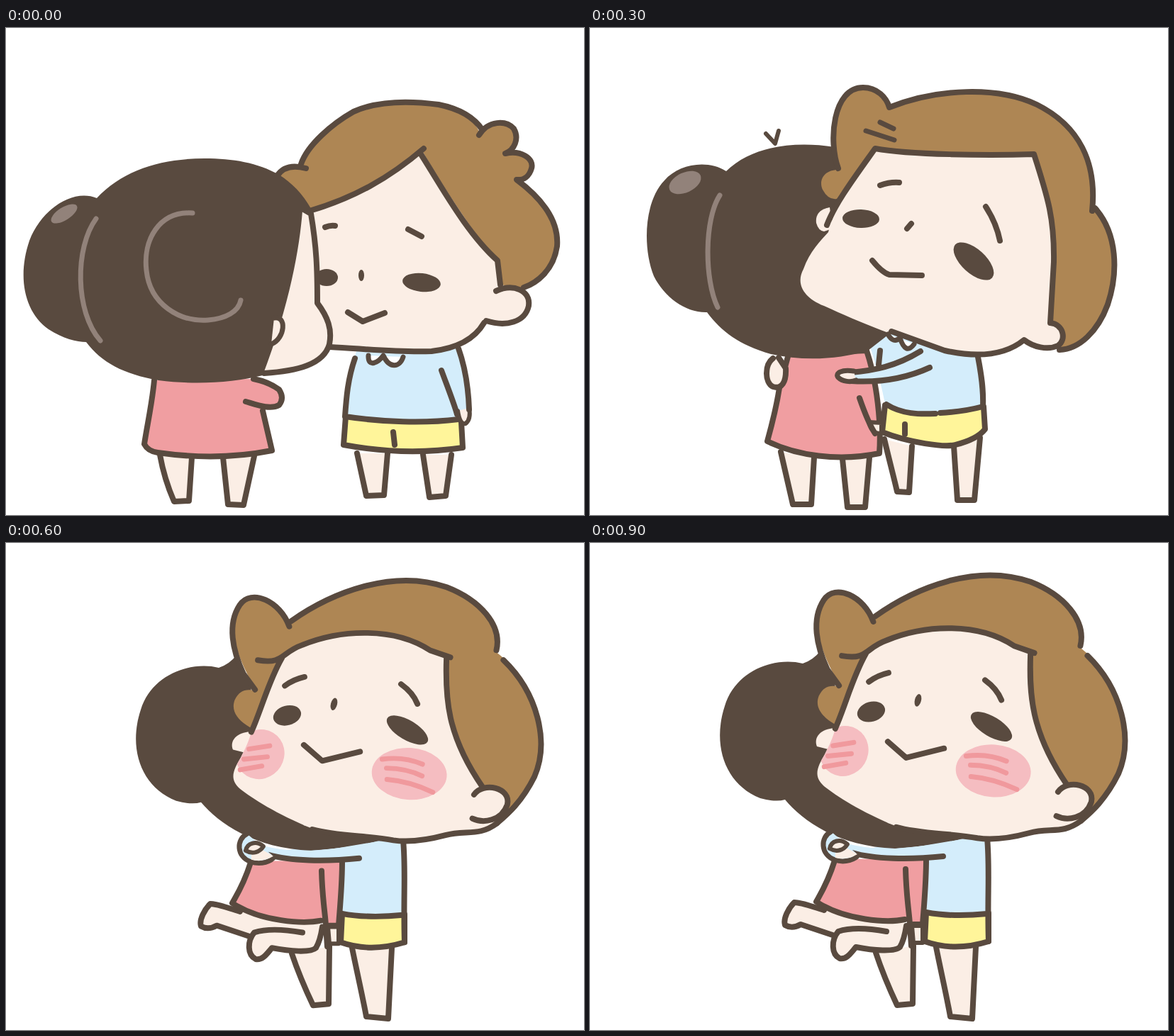
An HTML page that plays this animation: 815x687 px, repeating every 1000 ms.

```html
<!DOCTYPE html>
<html lang="en">
<head>
<meta charset="utf-8">
<title>Hug</title>
<style>
html, body { margin: 0; width: 100%; height: 100%; overflow: hidden; background: #fff; }
svg { display: block; width: 100%; height: 100%; stroke-linecap: round; stroke-linejoin: round; }
</style>
</head>
<body>
<svg id="stage" viewBox="0 0 815 687"></svg>
<script>
const INK = '#594a3f', SKIN = '#fbeee5', HAIR = '#ae8654', PINK = '#f09ea1', BLUE = '#d4edfb',
  YELLOW = '#fff59a', SHINE = '#92827a', BLUSH = '#f5bdc1', STREAK = '#f0999d';

const fill = (color, d) => `<path d="${d}" fill="${color}"/>`;
const line = (d, w = 8, color = INK) => `<path d="${d}" fill="none" stroke="${color}" stroke-width="${w}"/>`;
const shape = (color, d, w = 8) => `<path d="${d}" fill="${color}" stroke="${INK}" stroke-width="${w}"/>`;
const oval = (x, y, rx, ry, turn = 0, color = INK) =>
  `<ellipse cx="${x}" cy="${y}" rx="${rx}" ry="${ry}" fill="${color}" transform="rotate(${turn} ${x} ${y})"/>`;
const group = (transform, ...parts) => `<g transform="${transform}">${parts.join('')}</g>`;

// Girl standing, seen from behind
const girl =
  shape(SKIN, 'M217 602C222 630 230 652 237 668L258 667L262 606') +
  shape(SKIN, 'M306 606L313 672L335 673L350 604') +
  fill(PINK, 'M209 497L195 587Q200 598 214 600C270 607 325 606 375 596L361 538Q375 538 385 533Q393 522 385 510Q370 498 349 495Z') +
  line('M209 497C206 530 199 560 195 587Q200 597 214 599C270 607 325 606 375 596L362 540M338 527C352 531 372 539 385 532Q393 522 385 510Q370 499 349 495') +
  shape(SKIN, 'M418 255L430 262C438 310 439 340 439 388C454 408 460 425 456 446C448 475 410 484 364 487') +
  fill(INK, 'M128 240C95 226 50 255 33 300C16 350 25 400 60 425C80 438 100 443 113 443C135 472 165 488 215 497C270 504 320 500 362 490C400 390 414 310 418 258L434 262C420 235 405 220 385 207C355 190 320 184 280 184C220 184 165 200 128 240Z') +
  shape(SKIN, 'M378 409C396 405 394 438 374 446', 7) +
  oval(82, 262, 21, 9, -32, SHINE) +
  line('M127 269C97 310 97 400 133 441', 7, SHINE) +
  line('M263 261C215 258 193 300 198 342C203 390 245 415 285 412C310 410 328 400 331 384', 7, SHINE);

// Boy's upright head
const boyHair =
  fill(SKIN, 'M425 255L590 172L693 330L694 372L676 415C640 455 590 460 540 456L440 450Z') +
  fill(HAIR, 'M384 209Q395 190 418 192C425 165 460 135 490 118C530 100 580 104 610 108C640 114 660 128 668 148C680 130 705 130 716 142C724 155 717 170 712 176C730 170 745 185 741 196C738 208 730 215 722 213C755 240 780 270 777 310C770 345 745 360 725 367L697 362L693 330C660 290 620 230 588 175C540 215 480 245 430 258C415 240 400 220 384 209Z') +
  line('M382 209Q394 190 423 198M416 192C425 165 460 135 490 118C530 100 580 104 610 108C640 114 660 126 672 144') +
  line('M667 151C680 130 705 130 716 142C724 156 717 172 704 177C726 172 745 184 741 198C738 209 730 215 720 214C755 240 780 272 777 308C772 342 748 360 730 366') +
  line('M589 170C540 212 490 240 428 258M585 178C615 225 650 290 693 328L697 362') +
  line('M457 450C500 452 550 458 600 456C635 452 660 440 674 416') +
  shape(SKIN, 'M691 371C715 360 740 370 737 392C732 415 705 422 677 413');

const boyFace =
  line('M450 281Q457 278 464 279M567 284L586 294M482 401L503 414L534 402') +
  oval(452, 352, 16, 12) + oval(586, 359, 27, 13, 6) + oval(501, 349, 4, 8);

const boyBody =
  shape(SKIN, 'M495 600L508 660L533 659L538 600') +
  shape(SKIN, 'M588 602L597 662L620 660L628 602') +
  shape(YELLOW, 'M479 548L476 588C530 598 590 600 644 592L642 556') +
  fill(BLUE, 'M492 462L480 548Q560 560 640 552L653 535L638 450L500 440Z') +
  line('M492 466C482 495 480 520 478 548C530 556 590 558 638 552M546 570L548 588') +
  shape(SKIN, 'M637 540Q640 560 648 558Q656 552 653 536', 6) +
  line('M638 452C648 480 652 510 653 538M614 483C622 505 632 530 636 545');

const collar = shape('#fff', 'M511 462C510 480 525 472 532 462C540 480 555 480 560 464', 7);

const leanBody =
  fill(SKIN, 'M425 548C432 580 450 610 485 657L517 657C508 640 496 615 492 580Z') +
  fill(SKIN, 'M552 585C565 610 580 640 587 658H616C612 630 602 580 592 541Z') +
  line('M425 550C432 580 450 610 486 656M492 592C496 615 508 640 517 656M484 658H516') +
  line('M552 589C565 610 580 640 587 657M585 658L608 659M592 541C602 580 612 630 617 660') +
  fill(YELLOW, 'M422 545L437 575C480 586 540 587 594 578L592 541Z') +
  fill(BLUE, 'M436 465L422 545C470 560 540 558 592 540L585 462L455 445Z') +
  line('M432 480L426 505M424 530L421 546C480 560 540 556 592 541C588 520 586 490 584 463M437 575C480 586 540 587 590 578M499 569V588') +
  line('M416 512C450 500 500 478 538 467M416 527C460 522 510 518 554 509') +
  shape(SKIN, 'M416 512C400 512 388 525 397 536C405 543 416 530 416 520', 7) +
  shape('#fff', 'M474 453Q472 477 494 460', 7) + oval(513, 462, 12, 8);

const curl =
  fill(HAIR, 'M386 206C396 200 391 180 393 165C397 140 410 132 422 132C445 134 468 155 471 187L474 241L428 256Z') +
  line('M384 206C395 200 391 180 393 165C397 140 410 132 422 132C445 134 468 155 471 187M428 255C445 251 460 247 476 242');

// Head tilt: 0 upright, 1 fully leaned in
const tiltHead = k => group(
  `translate(${455 + 5 * k} ${350 - 11 * k}) rotate(${8 * k}) scale(${1 + .02 * k} ${1 - .02 * k}) translate(-455 -350)`,
  boyHair, group(`translate(${4 * k} ${3 * k})`, boyFace));

const stand = boyBody + tiltHead(0) + collar + girl;
const sway = group('translate(0 660) skewX(7) translate(0 -660)', boyBody) + tiltHead(.5) +
  group('translate(-24 2)', collar) + girl;
const lean = leanBody + tiltHead(1) + curl + girl;

const embrace =
  shape(SKIN, 'M415 580C422 610 430 640 433 654L450 655L454 590') +
  shape(SKIN, 'M513 590L518 666L542 666L550 578') +
  shape(YELLOW, 'M416 532L412 570C450 585 500 592 515 588C535 583 550 575 557 566L555 534') +
  fill(BLUE, 'M395 450C405 480 412 510 416 530C450 545 520 548 553 534C556 510 550 480 547 462L430 425Z') +
  line('M547 464C552 490 555 510 554 534C535 539 515 542 494 543M418 531C440 545 465 545 487 544M444 559V573') +
  shape(SKIN, 'M269 598L286 672L312 672L316 606') +
  shape(SKIN, 'M356 608L363 676L388 676L394 606') +
  shape(PINK, 'M267 508C262 540 255 565 250 583C290 603 350 612 408 600C411 560 405 500 390 455L280 460Z') +
  shape(SKIN, 'M258 466C246 475 246 500 258 506C270 510 277 500 276 480L266 465') +
  fill(INK, 'M192 202C165 185 125 192 105 215C76 245 74 310 90 350C105 380 135 402 165 401C185 428 210 447 255 460C300 470 350 468 392 455L424 430L345 168C280 158 225 170 192 202Z') +
  oval(134, 218, 24, 14, -25, SHINE) +
  line('M183 236C161 270 161 355 180 394', 7, SHINE) +
  line('M248 149L261 163L266 145', 6) +
  fill(BLUE, 'M466 456C430 478 400 482 370 486L372 497C400 500 440 497 479 479Z') +
  line('M466 456C430 478 400 483 368 486M479 479C440 497 400 500 368 498M409 455L407 475') +
  shape(SKIN, 'M372 484C355 481 345 487 350 493C356 499 368 500 375 497', 7) +
  shape(SKIN, 'M393 556Q398 575 411 571V557Z', 6) +
  line('M380 522C388 545 394 560 402 572') +
  fill(SKIN, 'M338 253Q317 257 319 275Q322 286 330 287L342 283Z') +
  fill(HAIR, 'M350 200C330 200 322 215 328 228Q336 243 348 241L402 170C450 178 560 180 625 178C648 230 655 300 650 405L664 454C695 452 718 425 730 390C745 340 740 290 709 255C718 190 690 138 630 110C570 82 480 88 422 112C418 98 405 84 385 84C345 85 335 160 350 200Z') +
  fill(SKIN, 'M402 170C440 178 560 180 625 178C648 230 655 300 650 415C668 418 672 440 660 448C645 455 625 450 612 440C585 462 545 465 500 455C440 440 380 415 330 392C300 380 290 360 301 340C310 315 325 300 336 288C345 250 375 210 402 170Z') +
  line('M350 198C336 160 342 84 385 84C405 84 418 98 422 112C490 85 575 82 630 108C690 138 715 190 708 258M712 254C744 290 745 345 730 390C716 428 690 453 662 454') +
  line('M334 278C345 248 375 208 402 170C450 179 560 180 626 178C646 240 655 270 654 330L649 416C668 418 672 440 660 448C645 455 625 450 612 440C585 462 545 465 500 455L425 428') +
  line('M389 145L429 158M409 133L428 142', 7) +
  line('M409 222Q423 217 436 218M558 252Q573 275 578 300M447 283L453 276M398 328Q412 345 422 348L468 349') +
  oval(382, 269, 26, 13, 2) + oval(541, 329, 35, 17, 42) +
  shape('#fff', 'M420 432Q428 446 437 437Q445 462 457 446', 7);

// Blushing head, shared by the hug and the lift; the cheeks slide a little when lifted
const jaw = 'M284 222L305 195C350 150 420 125 505 145C520 200 540 250 612 303L650 340C630 372 610 368 585 385C560 402 540 412 518 416C480 422 440 437 405 438C350 435 310 425 290 418C270 410 272 395 276 375C280 350 278 335 278 331Z';
const defs = `<defs><clipPath id="face"><path d="${jaw}"/></clipPath></defs>`;

const blushHead = slide =>
  fill(HAIR, 'M279 168C320 110 390 50 470 50C520 52 560 75 568 115C640 140 680 210 676 265C670 310 655 330 645 345L612 303C540 250 520 200 505 145C420 125 350 150 305 195L284 222L278 331C260 328 240 320 241 300C243 285 250 280 266 278C215 235 195 200 203 170C210 140 255 150 279 176Z') +
  fill(SKIN, jaw) +
  `<g clip-path="url(#face)">` +
  group(`translate(0 ${slide * 5})`, oval(300, 357, 34, 36, 12, BLUSH),
    line('M283 355L309 341M281 371L311 357M281 387L308 372', 7, STREAK)) +
  group(`translate(${slide * 12} ${slide * 13})`, oval(496, 306, 53, 37, -15 * slide, BLUSH),
    line('M453 299Q480 285 509 287M463 309Q490 300 514 303M469 324Q500 316 536 320', 7, STREAK)) + '</g>' +
  line('M279 176C255 146 210 142 203 170C195 202 215 235 240 261L263 277') +
  line('M279 168C320 110 390 50 470 50C520 52 562 75 566 112M580 122C640 150 680 210 676 265C671 305 658 328 648 345') +
  line('M253 236C290 230 280 215 305 195C350 155 420 128 478 143L508 143M503 145C520 200 540 250 612 303M284 222C277 260 281 300 278 336') +
  line('M648 345C630 372 610 368 585 385C560 402 540 412 518 416C480 422 440 437 405 439') +
  shape(SKIN, 'M604 317C610 295 650 290 653 315C653 340 630 352 613 350') +
  line('M301 258Q310 245 323 237M455 202Q475 208 486 221M354 329L386 342L432 312') +
  oval(318, 297, 20, 14, -35) + oval(485, 261, 33, 14, 12) + oval(375, 260, 4.5, 9, -5);

const hug =
  shape(SKIN, 'M322 586C332 625 342 655 348 670L377 670L369 588') +
  shape(SKIN, 'M430 586L424 667H445L449 584') +
  shape(SKIN, 'M384 588L397 668H420L430 590') +
  shape(SKIN, 'M471 578L485 666H508L521 573') +
  fill(BLUE, 'M515 415C525 450 530 490 532 525L468 532L460 475L420 440Z') +
  shape(YELLOW, 'M468 532L531 523L536 568Q505 575 468 575Z') +
  line('M515 418C526 460 531 500 534 568') +
  shape(PINK, 'M325 500C315 530 300 555 294 574C340 585 400 588 444 582L464 568L460 475L400 480Z') +
  shape(SKIN, 'M444 570H463Q463 583 455 583Q444 583 444 570', 6) +
  line('M434 497C438 525 442 550 443 578M460 475L464 568') +
  fill(INK, 'M205 268C185 264 160 275 140 305C113 345 115 400 145 435C170 462 210 468 242 462C290 480 370 483 420 468L500 424L300 410L290 240L222 240Q218 255 205 268Z') +
  fill(SHINE, 'M134 341Q140 310 160 295L172 300Q160 325 134 341Z') +
  line('M209 295C205 340 215 410 243 440', 8, SHINE) +
  fill(SKIN, 'M278 340C253 340 253 368 265 378L276 372Z') +
  fill(BLUE, 'M505 424C460 445 400 476 345 484V490C390 492 440 470 481 459L515 455Z') +
  line('M345 490C390 492 440 470 481 459M500 425C470 438 445 452 425 462') +
  shape(BLUE, 'M311 480C308 505 325 512 350 511C365 510 370 500 365 495', 7) +
  fill(SKIN, 'M332 503L348 494L364 496Q360 508 342 507Z') +
  shape(SKIN, 'M324 495C326 484 340 480 349 488C345 498 334 503 324 495', 6) +
  fill('#fff', 'M420 452L434 438L440 443ZM444 440L455 436L452 442Z') +
  blushHead(0);

const lift =
  shape(SKIN, 'M403 578C412 605 425 635 433 652L455 650L456 568') +
  shape(SKIN, 'M488 570C495 605 503 640 508 668L539 671L544 570') +
  shape(YELLOW, 'M474 521L472 562C500 572 530 572 562 562V522') +
  fill(BLUE, 'M562 415L563 524L474 522L478 445L380 435L480 410Z') +
  line('M560 416C564 460 560 500 562 562M474 521C500 526 530 526 560 523') +
  fill(SKIN, 'M330 518L288 507C280 515 272 530 275 539Q285 545 297 538L345 556L440 566L444 528Z') +
  line('M330 518C310 512 298 507 288 507C280 515 272 530 275 539Q285 545 297 538L342 553') +
  fill(SKIN, 'M418 548C390 543 365 543 350 548C340 560 340 580 352 586C362 588 368 578 375 570C400 575 430 577 437 570L446 536Z') +
  line('M418 548C390 543 365 543 350 548C340 560 340 580 352 586C362 588 368 578 375 570C400 575 430 577 437 570Q443 560 446 540') +
  fill(PINK, 'M345 446C335 480 325 495 319 506C360 533 420 536 444 531L470 540L474 445Z') +
  line('M345 448C335 480 325 495 319 506C360 533 420 536 444 531') +
  shape(SKIN, 'M454 540L456 564H469V540Z', 6) +
  line('M445 460C446 500 450 520 451 538L453 568M474 446C474 480 471 510 469 538H456') +
  fill(INK, 'M300 170C260 160 205 180 190 230C172 285 190 340 240 360Q262 366 275 362C300 392 350 428 430 431C470 428 500 424 530 416L420 395L350 280L345 190L325 152Q315 165 300 170Z') +
  fill(SKIN, 'M346 261C324 262 315 275 320 287L340 292Z') +
  fill(BLUE, 'M362 424C400 433 430 433 470 427L530 417L498 442C450 448 400 444 370 436Z') +
  line('M370 437C400 446 450 447 498 442') +
  shape(BLUE, 'M340 407C324 415 325 440 345 447C360 452 375 446 378 440', 7) +
  fill(SKIN, 'M346 437L362 430L377 439Q362 448 346 444Z') +
  shape(SKIN, 'M338 431C340 420 353 416 363 425C358 433 348 437 338 431', 6) +
  group('translate(566 259) rotate(19.2) translate(-485 -261)', blushHead(1));

// A slight squash onto the feet
const dip = group('translate(0 672) scale(1 .988) translate(0 -672)', lift);

const poses = { stand, sway, lean, embrace, hug, lift, dip };
const order = ['stand', 'sway', 'lean', 'embrace', 'hug', 'lift', 'dip', 'lift', 'dip', 'lift'];
const STEP = 100;

const stage = document.getElementById('stage');
stage.innerHTML = defs + Object.entries(poses)
  .map(([name, art]) => `<g data-pose="${name}" display="none">${art}</g>`).join('');
const layers = [...stage.querySelectorAll('[data-pose]')];

function draw(time) {
  const name = order[Math.floor(time / STEP) % order.length];
  for (const layer of layers)
    layer.setAttribute('display', layer.dataset.pose === name ? 'inline' : 'none');
}

let start;
function tick(now) {
  start ??= now;
  draw(Math.max(0, now - start));
  requestAnimationFrame(tick);
}
draw(0);
requestAnimationFrame(tick);
</script>
</body>
</html>
```
